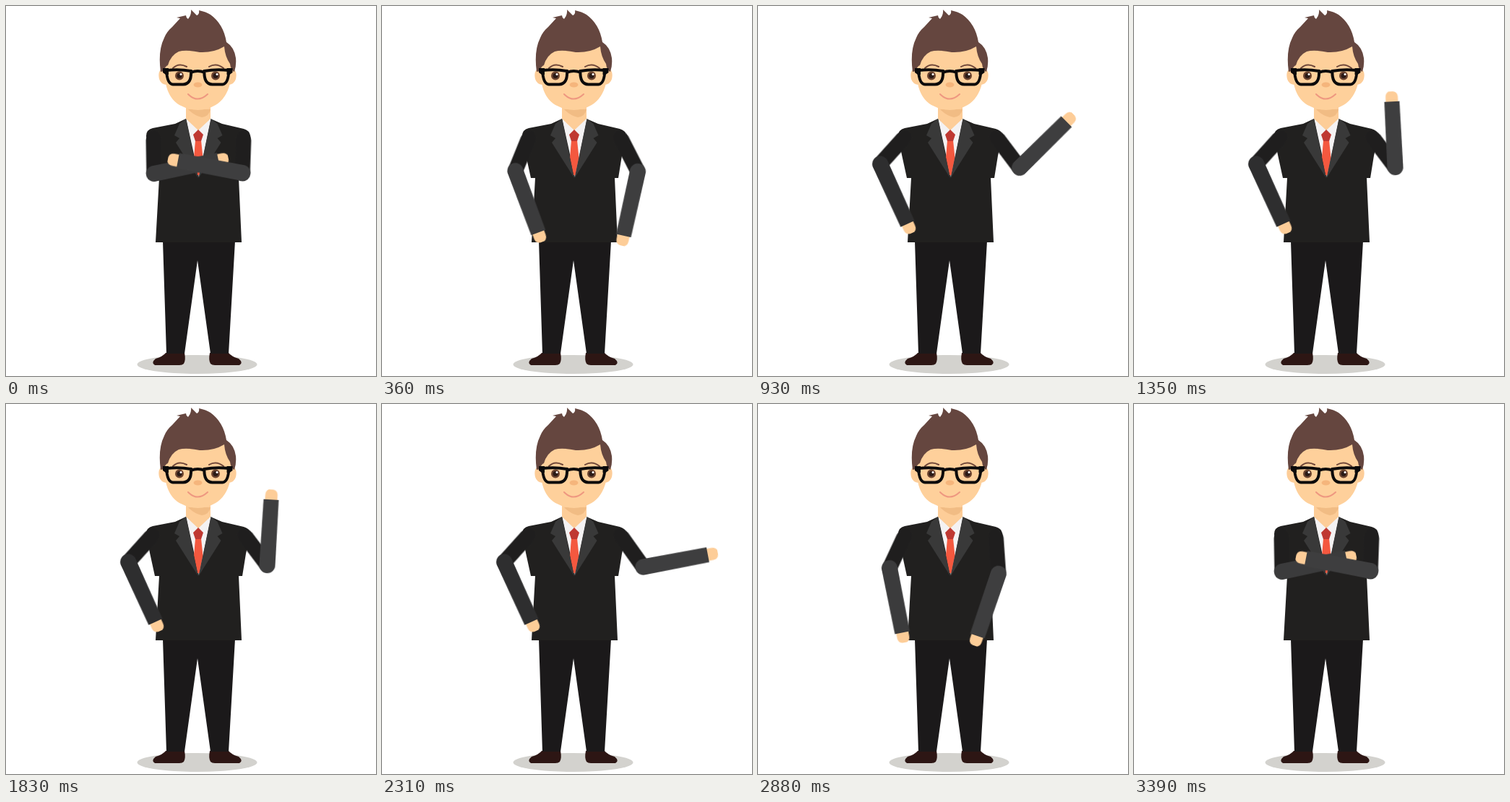
An HTML page that plays this animation: 512 px wide and 512 px high, repeating every 3780 ms.

```html
<!DOCTYPE html>
<html lang="en">
<head>
<meta charset="utf-8">
<title>Businessman waving</title>
<style>
  html, body { margin: 0; width: 100%; height: 100%; overflow: hidden; background: #fff; }
  svg { display: block; width: 100%; height: 100%; }

  .joint { transform-origin: 0 0; animation: 3780ms linear infinite; }
  .l-upper { animation-name: l-upper; }
  .l-fore { animation-name: l-fore; }
  .r-upper { animation-name: r-upper; }
  .r-fore { animation-name: r-fore; }

  @keyframes l-upper {
    0%, 89.683%, 100% { transform: rotate(-1deg); }
    9.524% { transform: rotate(22deg); }
    14.286% { transform: rotate(27deg); }
    23.81%, 61.111% { transform: rotate(42deg); }
    71.429% { transform: rotate(34deg); }
    76.19% { transform: rotate(25deg); }
    85.714% { transform: rotate(10deg); }
  }
  @keyframes l-fore {
    0%, 89.683%, 100% { transform: rotate(-101deg); }
    9.524% { transform: rotate(-42.5deg); }
    14.286% { transform: rotate(-39deg); fill: #3b3b3c; }
    23.81%, 61.111% { transform: rotate(-66.5deg); fill: #2e2e2f; }
    71.429% { transform: rotate(-43deg); fill: #3b3b3c; }
    76.19% { transform: rotate(-36deg); }
    85.714% { transform: rotate(-85deg); }
  }
  @keyframes r-upper {
    0%, 89.683%, 100% { transform: rotate(2deg); }
    9.524% { transform: rotate(-27deg); }
    14.286% { transform: rotate(-33deg); }
    24.603%, 57.143% { transform: rotate(-37deg); }
    61.111% { transform: rotate(-35.5deg); }
    71.429% { transform: rotate(-17deg); }
    76.19% { transform: rotate(-4deg); }
    85.714% { transform: rotate(-1deg); }
  }
  /* The elbow slides up the sleeve a little when the arms cross. */
  @keyframes r-fore {
    0%, 89.683%, 100% { transform: translateY(51px) rotate(99deg); }
    9.524% { transform: translateY(55px) rotate(39.7deg); }
    14.286% { transform: translateY(55px) rotate(12deg); }
    24.603% { transform: translateY(55px) rotate(-97.5deg); }
    29.365%, 42.857%, 57.143% { transform: translateY(54px) rotate(-124deg); }
    35.714%, 50.794% { transform: translateY(54px) rotate(-146deg); }
    48.413% { transform: translateY(54px) rotate(-139.5deg); }
    61.111% { transform: translateY(56px) rotate(-65.5deg); }
    71.429% { transform: translateY(55px) rotate(4deg); }
    76.19% { transform: translateY(55px) rotate(22.6deg); }
    85.714% { transform: translateY(53px) rotate(79deg); }
  }
</style>
</head>
<body>
<svg viewBox="0 0 512 512">
  <defs>
    <g id="forearm">
      <path d="M-8.500 88V98Q-8 104 -2 105H4Q8.500 103 8.500 97V88Z" fill="#fdcd98"/>
      <path d="M-11 0A11 11 0 0 1 11 0L10.500 91H-10.500Z"/>
    </g>
    <path id="sleeve" d="M-10.500 6Q-9 -8 0 -8Q9 -8 10.500 6V52A10.500 10.500 0 0 1 -10.500 52Z" fill="#1f1e1e"/>
    <g id="eye">
      <circle r="6" fill="#6b432f"/>
      <circle r="3.500" fill="#2a1a17"/>
      <circle cx="2" cy="-2" r="1.500" fill="#fff"/>
    </g>
    <g id="lens">
      <path d="M222 89Q240 87 256 90Q257 108 245 108.500H231Q223 108 222 89Z" fill="none" stroke="#0b0a0b" stroke-width="4"/>
      <path d="M217 86H225V95H221L217 92Z" fill="#0b0a0b"/>
    </g>
    <path id="lapel" d="M249 156L240 163L233 179L240 183L235 189L266 238Z" fill="#393939"/>
  </defs>

  <ellipse cx="264.500" cy="496" rx="83" ry="13" fill="#d3d2ce"/>

  <g id="legs">
    <g fill="#2d1614">
      <path d="M221 480H247Q249 490 246 495Q244 497 240 497H206Q200 494 207 488Q217 485 221 480Z"/>
      <path d="M308 480H282Q280 490 283 495Q285 497 289 497H323Q329 494 322 488Q312 485 308 480Z"/>
    </g>
    <path d="M217 325H317L308 481H283L265 352L247 481H222Z" fill="#1b191a"/>
  </g>

  <g id="torso">
    <path d="M249 156L234 163L203 169Q194 171 194 180L199 206L206 238H212L207 327H326L322 238H327L332 207L338 180Q337 172 329 170L299 163L283 156Z" fill="#21201f"/>
    <path d="M249 155H284L267 237Z" fill="#f4f2f3"/>
    <path d="M249 138H283V156L266 172L249 156Z" fill="#fdcd98"/>
    <path d="M252 143H283Q281 153 271 154Q261 152 252 143Z" fill="#f1bc84"/>
    <path d="M262 186H270L272.500 210L267.500 234H265L260 210Z" fill="#f4583f"/>
    <path d="M266 171L273 178L270 187H262L259 178Z" fill="#bf3832"/>
    <use href="#lapel"/>
    <use href="#lapel" transform="matrix(-1 0 0 1 532.500 0)"/>
  </g>

  <g id="head">
    <path d="M214 88Q210 92 212 101Q214 108 222 109V84ZM316 88Q320 92 318 101Q316 108 308 109V84Z" fill="#fdcd98"/>
    <path d="M219 62L302 52L311 70Q314 88 310 107Q305 128 290 137Q266 151 240 137Q225 128 221 107Q216 84 219 62Z" fill="#fed09b"/>
    <path d="M214 91Q210 62 219 44Q222 36 230 29L241 17L236 16L249 13Q249 16 252 18Q257 12 256 5L264 13Q268 11 267 6Q277 8 283 12Q301 25 305 50Q316 57 318 72Q319 82 316 91Q311 89 310 80Q303 70 302 56Q287 65 268 64Q249 60 239 63Q228 68 224 82Q220 83 219 90Z" fill="#65463f"/>
    <g fill="none" stroke-linecap="round" stroke-width="2">
      <path d="M231 86Q239 78 250 84M281 84Q291 78 301 86" stroke="#70483a"/>
      <path d="M252 122Q265 135 279 122" stroke="#ee9780"/>
    </g>
    <ellipse cx="265.500" cy="109" rx="6" ry="3.500" fill="#f5b57c"/>
    <use href="#eye" x="240" y="96.500"/>
    <use href="#eye" x="290" y="96.500"/>
    <use href="#lens"/>
    <use href="#lens" transform="matrix(-1 0 0 1 530.500 0)"/>
    <path d="M256 92Q265 88 275 92" fill="none" stroke="#0b0a0b" stroke-width="4"/>
  </g>

  <g transform="translate(204 180)">
    <g class="joint l-upper">
      <use href="#sleeve"/>
      <g transform="translate(0 52)">
        <use class="joint l-fore" href="#forearm" fill="#3b3b3c"/>
      </g>
    </g>
  </g>
  <g transform="translate(329 180)">
    <g class="joint r-upper">
      <use href="#sleeve"/>
      <use class="joint r-fore" href="#forearm" fill="#3e3e3f"/>
    </g>
  </g>
</svg>
</body>
</html>
```
